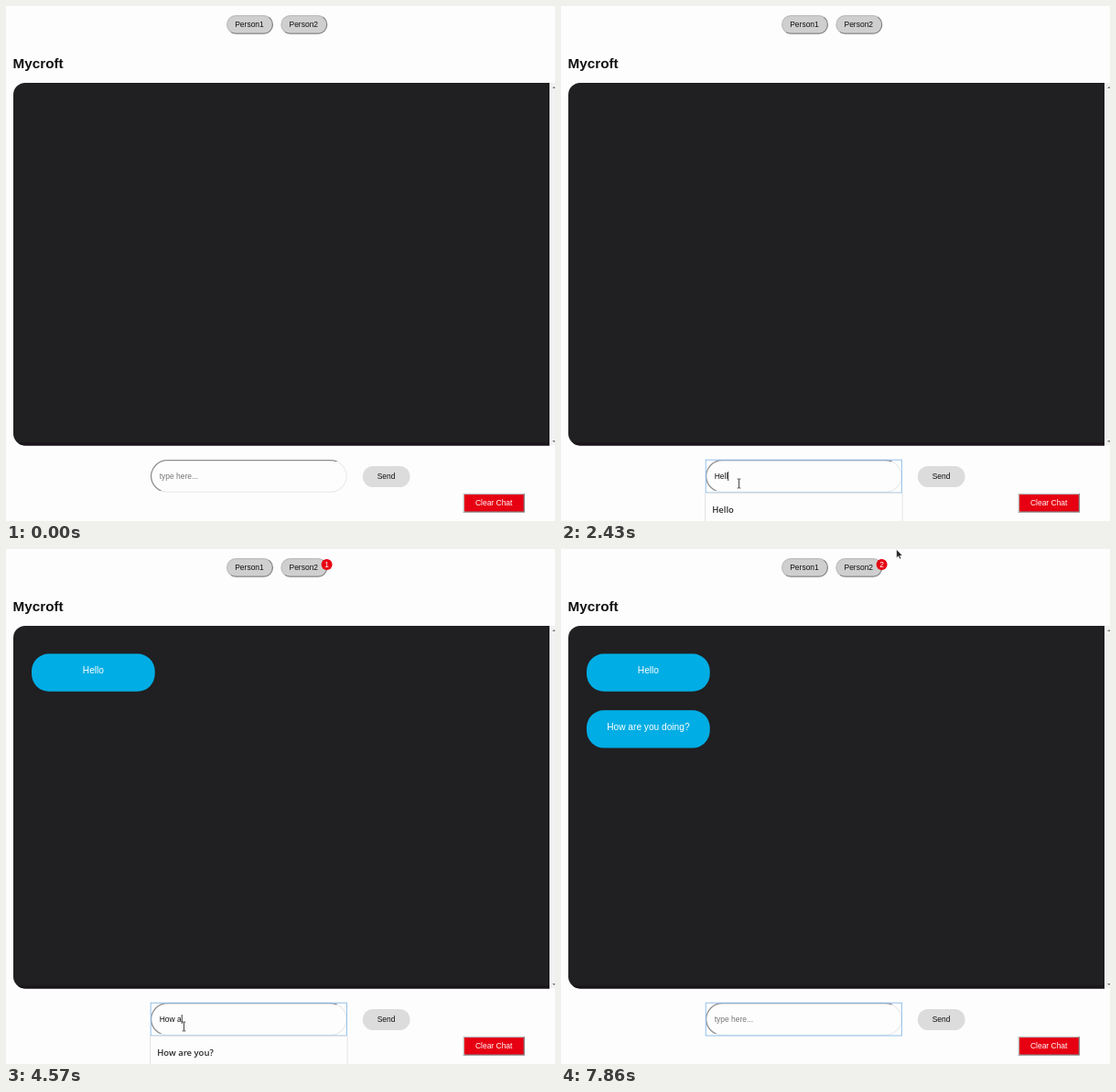
Write an HTML page that moves like this. It is 600 px wide and 563 px high and loops after 8000 ms.

```html
<!DOCTYPE html>
<html lang="en">
<head>
<meta charset="utf-8">
<title>Chat</title>
<style>
  html, body { margin: 0; height: 100%; overflow: hidden; background: #fefdfe; }
  svg { display: block; width: 600px; height: 563px; }
  text { font: 8.47px "Liberation Sans", Arial, sans-serif; fill: #111; }
  .mid { text-anchor: middle; }
  .light text { fill: #fff; }
  .bubble text { font-size: 10.16px; }
  #popup text { font: 600 9.5px "Open Sans", "Noto Sans", sans-serif; fill: #2b2b2d; }
</style>
</head>
<body>
<svg viewBox="0 0 600 563">
  <defs>
    <linearGradient id="outset" x2="1" y2="1">
      <stop offset=".5" stop-color="#bdbdbd"/><stop offset=".5" stop-color="#858585"/>
    </linearGradient>
    <linearGradient id="inset" x2="1" y2="1">
      <stop offset=".5" stop-color="#8d8d91"/><stop offset=".5" stop-color="#ececee"/>
    </linearGradient>
  </defs>

  <g class="mid" fill="#cfcfcf" stroke="url(#outset)" stroke-width="1.27">
    <rect x="241.6" y="10.6" width="49.8" height="19.6" rx="9.6"/>
    <rect x="300.9" y="10.6" width="49.8" height="19.6" rx="9.6"/>
  </g>
  <g class="mid">
    <text x="266" y="23.2">Person1</text>
    <text x="325.3" y="23.2">Person2</text>
  </g>
  <g id="badge" class="mid light">
    <circle cx="350.6" cy="17" r="6" fill="#e60012"/>
    <text id="count" x="350.6" y="20"></text>
  </g>
  <text x="7.6" y="67.5" style="font-size:15.24px;font-weight:bold">Mycroft</text>

  <path d="M594 84H21a13 13 0 0 0-13 13V467a13 13 0 0 0 13 13.5H594Z" fill="#201f21"/>
  <path d="M13 477.5H594V480.5H21Q16 480.5 13 477.5Z" fill="#19151a"/>
  <rect x="595" y="84" width="5" height="396" fill="#f3f2f3"/>
  <path d="M597 90l2-2 2 2zM597 475l2 2 2-2z" fill="#777"/>

  <g id="bubbles" class="mid light bubble" fill="#00ade4">
    <g><rect x="28" y="114.5" width="134.7" height="41.3" rx="19"/><text x="95.4" y="136">Hello</text></g>
    <g><rect x="28" y="176.3" width="134.7" height="41.3" rx="19"/><text x="95.4" y="197.8">How are you doing?</text></g>
  </g>

  <rect id="field" x="158.6" y="496.6" width="213.6" height="34.8" rx="17.8" stroke="url(#inset)" stroke-width="1.27"/>
  <rect id="focus" x="158.2" y="496.2" width="214.2" height="35.8" fill="none" stroke="#90bfe9"/>
  <text id="entry" x="167.7" y="517"></text>
  <rect id="caret" y="509" width=".8" height="10" fill="#111"/>

  <rect x="389.8" y="503" width="51.8" height="23" rx="11.5" fill="#dcdcdc"/>
  <text class="mid" x="415.6" y="517">Send</text>
  <g class="mid light">
    <rect x="500.3" y="533.5" width="66" height="19.6" fill="#e60012" stroke="url(#outset)" stroke-width="1.27"/>
    <text x="533.2" y="546.3">Clear Chat</text>
  </g>

  <g id="popup"></g>
  <path id="beam" d="M-1.8-5H-.4L0-4.6.4-5H1.8M0-4.6V4.6M-1.8 5H-.4L0 4.6.4 5H1.8" fill="none" stroke="#333" stroke-width=".9"/>
  <path id="arrow" d="M0 0V9.2L2.1 7.3 3.5 10.5 5 9.8 3.6 6.8H6.4Z" fill="#222" stroke="#fff" stroke-width=".5"/>
</svg>
<script>
const $ = id => document.getElementById(id);
const show = (el, on) => el.style.display = on ? '' : 'none';
const LOOP = 8000, ROW = 22.85;

const recent = ['Hello', 'hello', 'll', 'hey', 'j', 'yello'];
const onH = ['Hello', 'hello', 'hey', 'Hi, how are you?', 'Hey', 'hi'];
const onHe = ['Hello', 'hello', 'hey', 'Hey'];

// [start ms, field text, suggestions: list above, string below]
const typing = [
  [0, '', 0], [1140, '', recent],
  [1860, 'H', onH], [2000, 'He', onHe], [2140, 'Hel', onHe], [2290, 'Hel', 'Hello'],
  [2430, 'Hell', 'Hello'], [2710, 'Hello', 'Hello'],
  [3140, '', 'Hello'], [3710, 'H', 0], [3860, 'H', onH],
  ...['Ho', 'How', 'How ', 'How a', 'How ar', 'How are', 'How are ']
    .map((s, i) => [[4000, 4290, 4430, 4570, 4710, 4860, 5000][i], s, 'How are you?']),
  [5570, 'How are you?', 'How are you?'], [5860, 'How are you doing?', 'How are you?'],
  [6430, 'How are you doing?', 0], [6710, '', 0]
];

// [ms, x, y] pointer stops, linear in between
const pointer = [
  [0, 620, 370], [140, 600, 375], [1140, 194.5, 522], [5430, 194.5, 522],
  [5570, 200, 539], [5710, 206.5, 554], [5860, 210, 566], [6000, 212, 590],
  [7290, 420, -30], [7430, 408, -6], [7570, 400, 4], [7710, 383, 3], [7860, 366.7, .5], [8000, 366.7, .5]
];

const last = (rows, t) => rows.filter(r => r[0] <= t).pop();

function pointerAt(t) {
  const a = last(pointer, t), b = pointer[pointer.indexOf(a) + 1];
  const k = (t - a[0]) / (b[0] - a[0]);
  return [1, 2].map(i => a[i] + (b[i] - a[i]) * k);
}

function popupMarkup(list, hover) {
  if (!list) return '';
  const above = Array.isArray(list), rows = above ? list : [list];
  const height = above ? rows.length * ROW + 10 : 40;
  const top = above ? 495.2 - height : 532.6;
  const box = above
    ? `<rect x="157.7" y="${top}" width="214.7" height="${height}" rx="2" fill="#fefdfe"/>`
    : `<rect x="157.5" y="${top}" width="215.6" height="${height}" fill="#fefdfe" stroke="#e3e3e5"/>`;
  const mark = hover ? '<rect x="157" y="538" width="216.5" height="25" fill="#e9e9ea"/>' : '';
  const first = above ? top + 20 : 553.6;
  return box + mark + rows.map((s, i) => `<text x="165.2" y="${first + i * ROW}">${s}</text>`).join('');
}

let shown;
function draw(now) {
  const t = now % LOOP;
  const state = last(typing, t), [, text, list] = state;
  const focused = t >= 1140, preview = t >= 5570 && t < 6710;
  const hover = t >= 5570 && t < 5860;

  const key = state[0] + ':' + hover;
  if (key !== shown) {
    shown = key;
    $('entry').textContent = text || 'type here...';
    $('entry').style.fill = text ? '#111' : '#757575';
    $('popup').innerHTML = popupMarkup(list, hover);
    const width = text ? $('entry').getComputedTextLength() : 0;
    const gap = text.endsWith(' ') ? 2.4 : 0;
    $('caret').setAttribute('x', 167.8 + width + gap);
  }
  $('field').setAttribute('fill', preview ? '#e6effb' : '#fefdfe');
  show($('focus'), focused);
  show($('caret'), focused && !preview && t < 7430);

  const sent = (t >= 3140) + (t >= 6710);
  [...$('bubbles').children].forEach((b, i) => show(b, i < sent));
  show($('badge'), sent);
  $('count').textContent = sent;

  const [x, y] = pointerAt(t);
  const overField = x > 158 && x < 373 && y > 496 && y < 532;
  for (const id of ['beam', 'arrow']) {
    show($(id), (id === 'beam') === overField);
    $(id).setAttribute('transform', `translate(${x} ${y})`);
  }
}

const start = performance.now();
function tick() {
  draw(performance.now() - start);
  requestAnimationFrame(tick);
}
tick();
</script>
</body>
</html>
```
